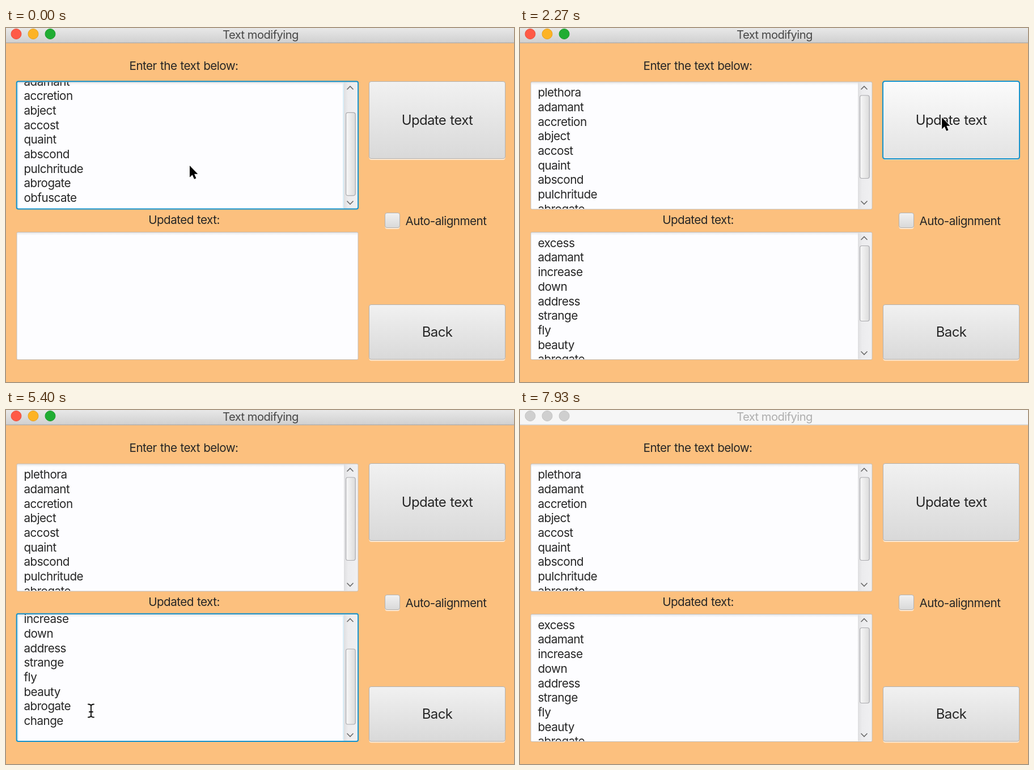
These frames come from a looping animation (896 by 625 pixels, 8000 ms). An HTML page:

```html
<!DOCTYPE html>
<html lang="en">
<head>
<meta charset="utf-8">
<title>Text modifying</title>
<style>
  html, body { margin: 0; width: 100%; height: 100%; overflow: hidden; background: #fcc07e; }
  #stage { display: block; width: 896px; height: 625px; }
  text { font: 20.7px Inter, Roboto, sans-serif; letter-spacing: -.027em; word-spacing: .045em; fill: #262626; white-space: pre; }
  .mid { text-anchor: middle; }
  .title { font-size: 20.2px; word-spacing: 0; fill: #474747; }
  .big { font-size: 24px; }
  .ring { fill: none; stroke: #1593cd; stroke-width: 2; }
  .chevron { fill: none; stroke: #6b6b6b; stroke-width: 1.6; }
  .thumb { fill: url(#thumbFill); stroke: #ababaf; stroke-width: 1.2; }
  .inactive .light { fill: #cfcfcf; stroke: #c3c3c3; }
  .inactive .title { fill: #aeaeae; }
  .inactive #bar { fill: #f6f6f6; }
  .inactive #barEdge { fill: #d4d0cb; }
</style>
</head>
<body>
<svg id="stage" viewBox="0 0 896 625">
  <defs>
    <linearGradient id="barFill" x2="0" y2="1"><stop stop-color="#e8e8e8"/><stop offset="1" stop-color="#d0d0d0"/></linearGradient>
    <linearGradient id="buttonFill" x2="0" y2="1"><stop stop-color="#f1f1f1"/><stop offset="1" stop-color="#d9d9d9"/></linearGradient>
    <linearGradient id="hoverFill" x2="0" y2="1"><stop stop-color="#fbfbfb"/><stop offset="1" stop-color="#e3e3e3"/></linearGradient>
    <linearGradient id="pressFill" x2="0" y2="1"><stop stop-color="#dcdcdc"/><stop offset="1" stop-color="#c6c6c6"/></linearGradient>
    <linearGradient id="thumbFill"><stop stop-color="#f8f8f8"/><stop offset="1" stop-color="#dcdcdc"/></linearGradient>
    <linearGradient id="trackFill"><stop stop-color="#dedee0"/><stop offset=".3" stop-color="#ececee"/><stop offset="1" stop-color="#f0f0f2"/></linearGradient>
    <linearGradient id="shade" x2="0" y2="1"><stop stop-color="#000" stop-opacity=".09"/><stop offset="1" stop-color="#000" stop-opacity="0"/></linearGradient>
    <path id="beamShape" d="M-5-11.5Q0-11.5 0-8Q0-11.5 5-11.5M0-8V8M-5 11.5Q0 11.5 0 8Q0 11.5 5 11.5M-3 2H3"/>
  </defs>
  <rect width="896" height="625" fill="#fcc07e"/>
  <rect id="bar" width="896" height="26" fill="url(#barFill)"/>
  <rect id="barEdge" y="25.5" width="896" height="1.5" fill="#b5afa8"/>
  <circle class="light" cx="18" cy="10.5" r="9" fill="#ff5a46" stroke="#e8503e"/>
  <circle class="light" cx="48" cy="10.5" r="9" fill="#fdb324" stroke="#e5a11f"/>
  <circle class="light" cx="78" cy="10.5" r="9" fill="#20ad33" stroke="#1c9a2d"/>
  <text class="mid title" x="449" y="18.5">Text modifying</text>
  <text class="mid" x="313.5" y="74">Enter the text below:</text>
  <text class="mid" x="314" y="346">Updated text:</text>
  <text x="704.5" y="347.5">Auto-alignment</text>
  <g id="widgets"></g>
  <g id="cursor">
    <path id="arrow" d="M0 0V20.5L4.7 16.2 8 23.8 11.4 22.3 8.1 14.8H14.3Z" stroke="#fff" stroke-width="1.6" paint-order="stroke"/>
    <g id="beam" fill="none" stroke-linecap="round">
      <use href="#beamShape" stroke="#fff" stroke-width="4"/>
      <use href="#beamShape" stroke="#111" stroke-width="1.9"/>
    </g>
  </g>
</svg>
<script>
const LOOP = 8000, LINE = 25.68;
const $ = id => document.getElementById(id);
const show = (el, on) => el.setAttribute('visibility', on ? 'visible' : 'hidden');

const inputWords = 'plethora adamant accretion abject accost quaint abscond pulchritude abrogate obfuscate'.split(' ');
const outputWords = 'excess adamant increase down address strange fly beauty abrogate change'.split(' ');

const button = (id, x, y, w, h, label = '') => `
  <rect x="${x + .5}" y="${y + 2}" width="${w - 1}" height="${h}" rx="4" fill="#fff" opacity=".65"/>
  <rect id="${id}" x="${x + .5}" y="${y + .5}" width="${w - 1}" height="${h - 1}" rx="3.5" fill="url(#buttonFill)" stroke="#b3b1af"/>
  <rect id="${id}Ring" class="ring" x="${x}" y="${y}" width="${w}" height="${h}" rx="3.5" visibility="hidden"/>
  <text class="mid big" x="${x + w / 2}" y="${y + h / 2 + 8.5}">${label}</text>`;

const area = (id, y, words, thumbLength) => `
  <rect x="19" y="${y}" width="602" height="225" rx="2" fill="#fdfdff" stroke="#c4bdb6"/>
  <rect x="20" y="${y + .5}" width="600" height="5" fill="url(#shade)"/>
  <g id="${id}Content">
    <svg x="20" y="${y + .5}" width="576" height="223.5">
      <g id="${id}Lines">
        ${words.map((word, i) => `<text x="11.5" y="${25.8 + i * LINE}">${word}</text>`).join('')}
        <rect id="${id}Caret" x="75" y="6.5" width="1.6" height="26" fill="#111" visibility="hidden"/>
      </g>
    </svg>
    <rect x="596" y="${y + 1}" width="24" height="223" fill="url(#trackFill)"/>
    <path class="chevron" d="M601.5 ${y + 13.5}l5.5-5.5 5.5 5.5M601.5 ${y + 210.5}l5.5 5.5 5.5-5.5"/>
    <rect id="${id}Thumb" class="thumb" x="599.6" y="${y + 24}" width="16.6" height="${thumbLength}" rx="3.5"/>
  </g>
  <g id="${id}Ring">
    <path d="M21 ${y + 1}v222M595 ${y + 1}v222" stroke="#d9eff9" stroke-width="2"/>
    <rect class="ring" x="18.7" y="${y - .8}" width="602.4" height="225.3" rx="3"/>
  </g>`;

$('widgets').innerHTML =
  area('input', 95, inputWords, 146.5) + area('output', 360.5, outputWords, 133) +
  button('update', 640, 94, 241, 137, 'Update text') +
  button('back', 640, 488, 241, 97.5, 'Back') +
  button('check', 668, 326, 27, 27);

// Each key is [time, ...values]; values ease from key to key.
const pointerKeys = [[0, 324, 243], [700, 324, 243], [1200, 756, 150], [2200, 756, 150], [2950, 225, 504],
  [3200, 225, 504], [3650, 190, 383], [4000, 190, 383], [4450, 150, 531], [5950, 150, 531],
  [6350, 123, 169], [7200, 123, 169], [7600, -30, 110]];
const inputScroll = [[0, 1], [200, 1], [650, 0], [6450, 0], [6700, 1], [6950, 1], [7250, 0]];
const outputScroll = [[4900, 0], [5300, 1], [5500, 1], [5850, 0]];
const clicked = { update: 1900, output: 3750, input: 6400 };

function ease(keys, t) {
  const next = keys.findIndex(key => key[0] > t);
  if (next < 0) return keys[keys.length - 1].slice(1);
  if (!next) return keys[0].slice(1);
  const a = keys[next - 1], b = keys[next];
  const u = (t - a[0]) / (b[0] - a[0]), k = u * u * (3 - 2 * u);
  return a.slice(1).map((v, i) => v + (b[i + 1] - v) * k);
}

function scroll(id, amount, distance, travel) {
  $(id + 'Lines').setAttribute('transform', `translate(0 ${-amount * distance})`);
  $(id + 'Thumb').setAttribute('transform', `translate(0 ${amount * travel})`);
}

function draw(t) {
  const [x, y] = ease(pointerKeys, t);
  const active = t < 7600;

  scroll('input', ease(inputScroll, t)[0], 45.4, 30.3);
  scroll('output', ease(outputScroll, t)[0], 62, 37.5);

  const inOutput = t >= clicked.output && t < clicked.input;
  show($('inputRing'), t < clicked.update || (t >= clicked.input && active));
  show($('updateRing'), t >= clicked.update && t < clicked.output);
  show($('outputRing'), inOutput);
  show($('outputContent'), t >= clicked.update + 100);
  show($('outputCaret'), inOutput && (t - clicked.output) % 1000 < 500);

  const hover = x > 640 && x < 881 && y > 94 && y < 231;
  const pressed = t >= clicked.update && t < clicked.update + 100;
  $('update').setAttribute('fill', `url(#${pressed ? 'press' : hover ? 'hover' : 'button'}Fill)`);

  const overText = t > clicked.update && x > 19 && x < 621 && (y > 95 && y < 320 || y > 360 && y < 585);
  show($('beam'), overText);
  show($('arrow'), !overText);
  $('cursor').setAttribute('transform', `translate(${x} ${y})`);
  $('stage').classList.toggle('inactive', !active);
}

const start = performance.now();
function tick() {
  const t = (performance.now() - start) % LOOP;
  draw(Math.floor(t * .015 + .06) / .015);
  requestAnimationFrame(tick);
}
tick();
</script>
</body>
</html>
```
